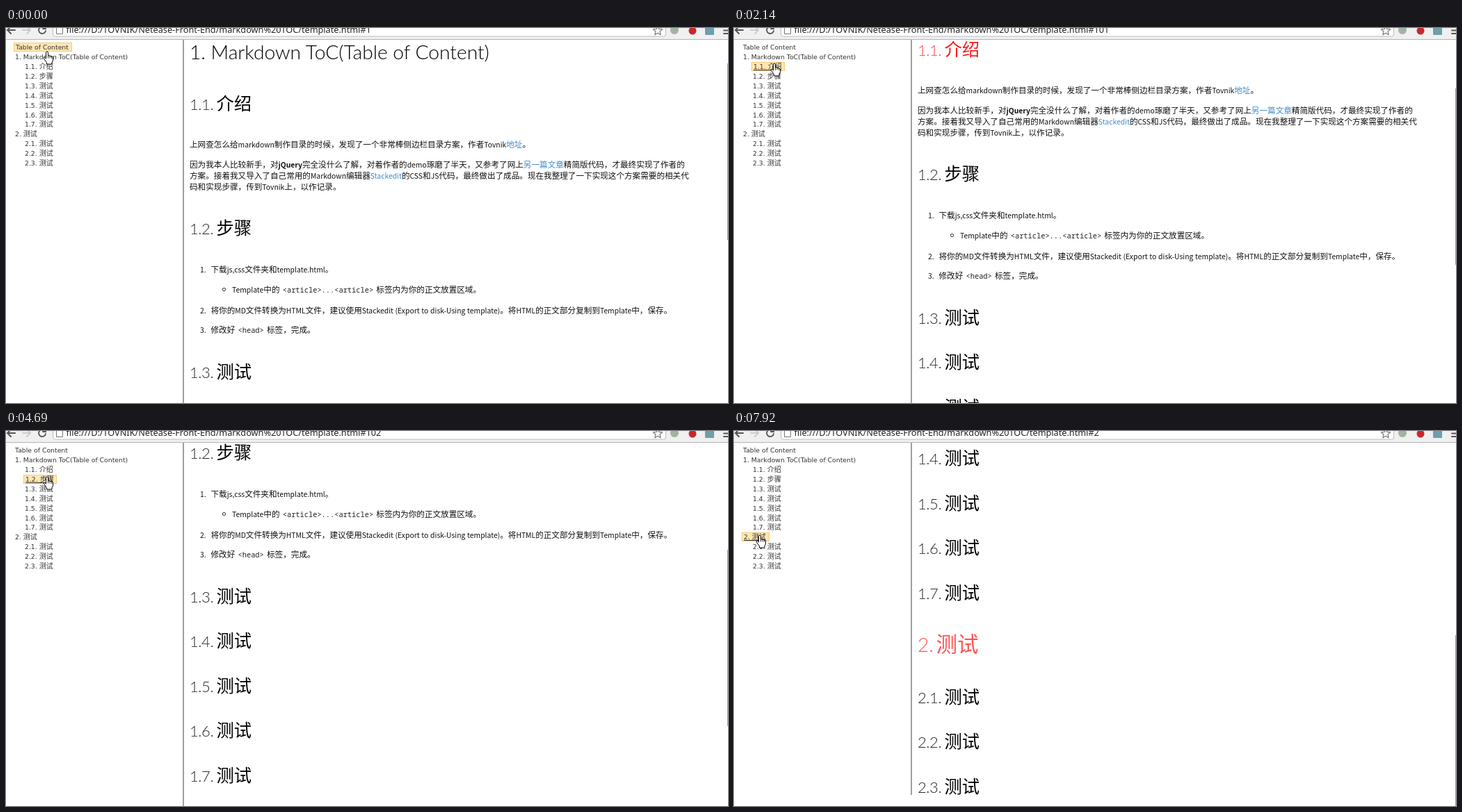
Write an HTML page that moves like this. It is 1038 px wide and 540 px high and loops after 8000 ms.

```html
<!DOCTYPE html>
<html lang="zh-CN">
<head>
<meta charset="utf-8">
<title>Markdown ToC</title>
<style>
  html, body { margin: 0; width: 100%; height: 100%; overflow: hidden; background: #fff; }
  svg { display: block; }
  text { white-space: pre; text-spacing-trim: space-all; }
  .body { font: 11.6px "Noto Sans CJK SC", "Noto Sans CJK", sans-serif; word-spacing: .4px; fill: #111; }
  .body .latin { font-size: 10.37px; }
  .body .a { fill: #428bca; }
  .body .b { font-weight: 700; }
  .body .c { font: 10.35px "Noto Sans Mono", "DejaVu Sans Mono", monospace; fill: #222; }
  .num { font: 300 22px Lato, "Open Sans", sans-serif; letter-spacing: -.4px; fill-opacity: .85; }
  .big .num { font-size: 28.2px; letter-spacing: 0; fill-opacity: 1; }
  .han { font: 25.3px "Noto Sans CJK SC", "Noto Sans CJK", sans-serif; }
  .big .han { font-size: 30.5px; }
  .side { font: 10px "Noto Sans CJK SC", "Noto Sans CJK", sans-serif; fill: #333; }
  .side .latin { font: 9.3px "DejaVu Sans", sans-serif; }
  .url { font: 12.7px "Noto Sans", "Open Sans", sans-serif; fill: #222; }
</style>
</head>
<body>
<svg width="1038" height="540" viewBox="0 0 1038 540">
  <rect width="1038" height="540" fill="#fff"/>
  <g id="page"></g>
  <rect id="divider" x="254" y="17" width="2" fill="#98a59e"/>
  <rect id="thumb" x="1037" width="1" height="254" fill="#999"/>

  <rect id="picked" height="12" fill="#ffe7b4" stroke="#f7c878"/>
  <g id="toc" class="side"></g>
  <rect id="underline" height="1" fill="#333"/>

  <g id="toolbar" fill="none" stroke-linecap="round">
    <rect width="1038" height="17" fill="#f0f0f0"/>
    <rect y="16" width="1038" height="1" fill="#b4b4b4"/>
    <rect x="67.5" y="-15" width="881" height="27" rx="3" fill="#fff" stroke="#bdbdbd"/>
    <path d="M2 3H13M7-2L2 3L7 8" stroke="#555" stroke-width="2"/>
    <path d="M24 3H35M30-2L35 3L30 8" stroke="#ccc" stroke-width="2"/>
    <path d="M56 0A5 5 0 1 0 57 4M57-3V1H53" stroke="#555" stroke-width="1.8"/>
    <path d="M72.5-5V8.5H81.5V-2" stroke="#777"/>
    <path id="star" stroke="#777" stroke-width="1.2" stroke-linejoin="round"/>
    <circle cx="961" cy="3" r="6" fill="#a3b3a3"/>
    <circle cx="987" cy="4" r="5.5" fill="#c8282d"/>
    <rect x="1005" y="-3" width="13" height="13" rx="1" fill="#6f9fab"/>
    <path d="M1032-1H1040M1032 3.5H1040M1032 8H1040" stroke="#555" stroke-width="2"/>
  </g>
  <text id="url" class="url" x="86.5" y="7"></text>

  <g id="hand" stroke="#000" stroke-linejoin="round">
    <path fill="#fff" d="M-1.5 1.5a1.5 1.5 0 0 1 3 0V5.5l5 1.2q2 .5 2 2.5v3.5l-1.5 3v2.3h-7.5v-2.3l-4-5.5q-1-2.2.8-2.2l2.200 2z"/>
    <path fill="none" stroke-width=".8" d="M1.5 5.5V9.5M4 6.2V9.5M6.4 7V9.8"/>
  </g>
</svg>
<script>
const LOOP = 8000, ROW = 13.93;
const $ = id => document.getElementById(id);

const escapeText = s => s.replace(/&/g, '&amp;').replace(/</g, '&lt;').replace(/>/g, '&gt;');
const span = (cls, s, dx = 0) => `<tspan class="${cls}" dx="${dx}">${escapeText(s)}</tspan>`;

// {a|link}, {b|bold} and {c|code} mark styled parts; Latin runs get their own size.
// Code has a small padding on both sides.
function mixed(source) {
  let pad = 0;
  return source.split(/(\{\w\|[^}]*\})/).map(part => {
    const [, cls, inner] = part.match(/^\{(\w)\|(.*)\}$/) || [null, '', part];
    if (cls === 'c') {
      pad = 1.5;
      return span('c', inner, pad);
    }
    return (inner.match(/[\x20-\x7e]+|[^\x20-\x7e]+/g) || []).map(run => {
      const dx = pad;
      pad = 0;
      return span((/[\x20-\x7e]/.test(run) ? 'latin ' : '') + cls, run, dx);
    }).join('');
  }).join('');
}

const label = (x, y, source) => `<text x="${x}" y="${y}">${mixed(source)}</text>`;

// number, title, vertical centre in the unscrolled page
const headings = [
  ['1.', 'Markdown ToC(Table of Content)', 34],
  ['1.1.', '介绍', 109],
  ['1.2.', '步骤', 288],
  ...[3, 4, 5, 6, 7].map(n => [`1.${n}.`, '测试', 495 + (n - 3) * 64.4]),
  ['2.', '测试', 827.5],
  ...[1, 2, 3].map(n => [`2.${n}.`, '测试', 903 + (n - 1) * 64.3])
];

const lines = [
  [264, 172, '上网查怎么给markdown制作目录的时候，发现了一个非常棒侧边栏目录方案，作者Tovnik{a|地址}。'],
  [264, 201, '因为我本人比较新手，对{b|jQuery}完全没什么了解，对着作者的demo琢磨了半天，又参考了网上{a|另一篇文章}精简版代码，才最终实现了作者的'],
  [264, 217, '方案。接着我又导入了自己常用的Markdown编辑器{a|Stackedit}的CSS和JS代码，最终做出了成品。现在我整理了一下实现这个方案需要的相关代'],
  [264, 233, '码和实现步骤，传到Tovnik上，以作记录。'],
  [279, 352, '1.'],
  [294.5, 352, '下载js,css文件夹和template.html。'],
  [325, 380.5, 'Template中的 {c|<article>...<article>} 标签内为你的正文放置区域。'],
  [279, 410.5, '2.'],
  [294.5, 410.5, '将你的MD文件转换为HTML文件，建议使用Stackedit (Export to disk-Using template)。将HTML的正文部分复制到Template中，保存。'],
  [279, 439, '3.'],
  [294.5, 439, '修改好 {c|<head>} 标签，完成。']
];

function headingMarkup([num, title, mid], i) {
  const big = num.length === 2;
  const y = mid + (big ? 10.5 : 9);
  const body = i === 0
    ? `<text class="num" x="264" y="${y}">${num} ${title}</text>`
    : `<text class="num" x="264" y="${y}">${num}</text>
       <text class="han" x="${big ? 290.5 : 302.4}" y="${y}">${title}</text>`;
  return `<g class="heading${big ? ' big' : ''}">${body}</g>`;
}

$('page').innerHTML = headings.map(headingMarkup).join('') +
  `<g class="body">${lines.map(l => label(...l)).join('')}</g>
   <circle cx="313.5" cy="376.5" r="2.1" fill="none" stroke="#222"/>`;

// Sidebar rows: text, left edge, text width
const rows = [
  ['Table of Content', 13, 76],
  ...headings.map(([num, title], i) =>
    [`${num} ${title}`, num.length === 2 ? 13 : 27, i === 0 ? 163 : num.length === 2 ? 32 : 40])
];
$('toc').innerHTML = rows.map(([text, x], i) => label(x, 31 + ROW * i, text)).join('');

$('star').setAttribute('d', 'M' + Array.from({ length: 10 }, (_, i) => {
  const a = i * Math.PI / 5, r = i % 2 ? 3.2 : 7;
  return `${937 + r * Math.sin(a)} ${4 - r * Math.cos(a)}`;
}).join('L') + 'Z');

const headingEls = document.querySelectorAll('.heading');
const rowEls = $('toc').children;

// time, fingertip x, fingertip y, hovered row
const moves = [
  [0, 59, 34, -1], [140, 64, 82, 4], [270, 58, 146, 8], [420, 57, 186, 11],
  [700, 57, 170, 10], [830, 57, 144, 8], [960, 57, 114, 6], [1080, 57, 86, 4], [1210, 57, 63, 3],
  [1480, 57, 57, 2], [1600, 57, 50, 2], [1850, 58, 51, 2],
  [3400, 57, 54, 2], [3520, 57, 57, 2], [3670, 58, 63, 3], [3800, 59, 66, 3],
  [5090, 59, 71, 3], [5210, 59, 81, 4], [5340, 59, 91, 5], [5470, 59, 100, 5], [5740, 59, 106, 6],
  [6950, 57, 112, 6], [7100, 56, 141, 8], [7380, 37, 150, 9]
];

// A click scrolls, selects a row and flashes a heading until the end time.
const clicks = [
  { at: 0, end: 0, scroll: 0, row: 0, target: 0, hash: 1 },
  { at: 2140, end: 2650, scroll: 78, row: 2, target: 1, hash: 101 },
  { at: 4190, end: 4690, scroll: 257, row: 3, target: 2, hash: 102 },
  { at: 5990, end: 6670, scroll: 520, row: 5, target: 5, hash: 105 },
  { at: 7800, end: 8400, scroll: 520, row: 9, target: 8, hash: 2 }
];

function set(el, attrs) {
  for (const name in attrs) el.setAttribute(name, attrs[name]);
}

function render(t) {
  const [, x, y, hover] = moves.findLast(m => m[0] <= t);
  const click = clicks.findLast(c => c.at <= t);
  const { scroll, row } = click;

  set($('page'), { transform: `translate(0 ${-scroll})` });
  set($('divider'), { height: Math.min(540, 1044 - scroll) - 17 });
  set($('thumb'), { y: Math.round(51 + scroll * 0.467) });
  $('url').textContent = `file:///D:/TOVNIK/Netease-Front-End/markdown%20TOC/template.html#${click.hash}`;

  const flashing = t < click.end;
  const fade = Math.max(0, 0.9 - 0.0019 * 120 * Math.floor((t - click.at) / 120));
  headingEls.forEach((el, i) => {
    const lit = flashing && i === click.target;
    set(el, { fill: lit ? '#f00' : '#000', opacity: lit ? fade : 1 });
  });

  const [, left, width] = rows[row];
  set($('picked'), { x: left - 1.5, y: Math.round(ROW * row) + 21.5, width: width + 7 });
  [...rowEls].forEach((el, i) => set(el, { x: rows[i][1] + (i === row ? 1 : 0) }));

  set($('underline'), { visibility: hover < 0 ? 'hidden' : 'visible' });
  if (hover >= 0) {
    const [, from, length] = rows[hover];
    set($('underline'), { x: from + (hover === row ? 1 : 0), y: Math.round(32 + ROW * hover), width: length });
  }
  set($('hand'), { transform: `translate(${x} ${y})` });
}

const start = performance.now();
function tick() {
  render((performance.now() - start) % LOOP);
  requestAnimationFrame(tick);
}
tick();
</script>
</body>
</html>
```
